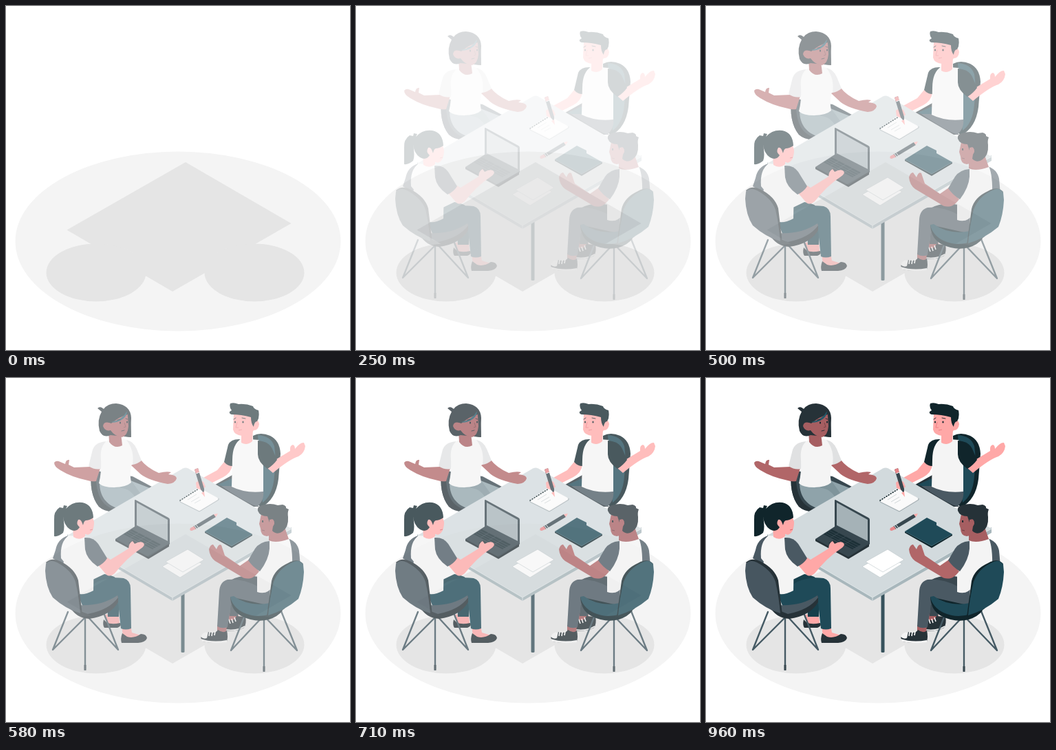
An HTML page for the animation above (1 s loop, 500 by 500 pixels).

```html
<!DOCTYPE html>
<html lang="en">
<head>
<meta charset="utf-8">
<title>Round the table</title>
<style>
html, body { margin: 0; width: 100%; height: 100%; overflow: hidden; background: #fff; }
svg { display: block; width: 100vw; height: 100vh; }
#scene { opacity: 0; }
.ink { fill: #10252b; }
.dark { fill: #263238; }
.slate { fill: #37474f; }
.grey { fill: #4a5963; }
.teal { fill: #1f4a58; }
.steel { fill: #8fa3aa; }
.white { fill: #f4f4f4; }
.shade { fill: #e0e1e2; }
.pink { fill: #ffa8a7; }
.brown { fill: #b16668; }
.deep { fill: #a65e61; }
.line { fill: none; stroke: #10252b; stroke-linecap: round; stroke-linejoin: round; }
.leg { fill: none; stroke: #455a64; stroke-width: 2.4; stroke-linecap: round; stroke-linejoin: round; }
</style>
</head>
<body>
<svg viewBox="0 0 500 500">
  <ellipse cx="250" cy="342" rx="236.5" ry="130.5" fill="#f4f4f4"/>
  <g fill="#e5e5e5">
    <path d="M261 227L414.500 316L242 415L88.500 325.500Z"/>
    <ellipse cx="131" cy="387.500" rx="72.500" ry="42"/>
    <ellipse cx="361" cy="387.500" rx="72.500" ry="42"/>
  </g>

  <g id="scene">
    <!-- back left -->
    <g>
      <path class="slate" d="M125 134C121 154 125 175 135 187Q143 194 154 194L212 158L184 143Z"/>
      <path class="dark" d="M125 134C121 154 125 175 135 187Q143 194 154 194L158 191C140 186 133 172 131 150Z"/>
      <path class="steel" d="M136 152C136 172 146 184 161 189L209 160L181 149Z"/>
      <path d="M158 160Q178 157 188 174L196 169Q187 155 181 149Z" fill="#7f949b"/>
      <path class="brown" d="M123 129L137 131L131 150Q125 151 119 149Q95 144 79 134Q70 129 70 123Q73 119 79 122L86 125Q87 118 92 119L91 126L99 130Z"/>
      <path class="shade" d="M146 92Q130 93 126 104L120 128Q129 134 138 132L142 112Z"/>
      <path class="white" d="M147 91L172 89Q183 91 188 99L190 124Q187 127 183 127Q179 137 182 152Q174 159 157 159Q141 159 135 153Q139 138 138 119Q136 99 147 91Z"/>
      <path class="deep" d="M149 78L150 93Q158 104 169 98L167 80Z"/>
      <path class="dark" d="M142 45Q137 40 133 44L139 49Q132 61 136 77Q141 88 152 83L181 86L182 58Q181 39 160 37Q148 37 142 45Z"/>
      <path class="deep" d="M153 66Q165 56 177 53L178 70Q177 83 169 86Q158 85 152 76Q144 78 141 70Q142 63 150 65Z"/>
      <path d="M153 64Q169 61 176 48Q176 57 166 62Q158 66 153 64Z" fill="#24596a"/>
      <path class="dark" d="M175 47Q182 53 182 86L174 85Q180 76 178 57Z"/>
      <ellipse class="ink" cx="166" cy="65" rx="1" ry="1.500"/>
      <ellipse class="ink" cx="176" cy="64" rx="1" ry="1.500"/>
      <path class="line" d="M162 61l4-1M174 59l3 1M168 77l4-1" stroke-width=".8"/>
      <path d="M172 65l2 6l-3 1" fill="none" stroke="#713d42" stroke-width=".8"/>
    </g>

    <!-- back right -->
    <g>
      <path class="ink" d="M359 84Q370 78 384 84Q398 91 399 110L396 147Q392 177 371 188L361 180Z"/>
      <path class="teal" d="M366 83Q385 84 390 99Q393 117 390 143Q388 170 373 181Z"/>
      <path class="dark" d="M304 155L329 141L332 166L368 187L355 187Z"/>
      <path class="teal" d="M308 155L328 146L329 162Z"/>
      <path class="grey" d="M329 157L374 163Q376 178 365 187Q348 181 313 157Z"/>
      <path class="pink" d="M317 122L329 127Q327 138 316 144L288 158Q279 163 276 157Q276 150 283 147L307 134Z"/>
      <path class="pink" d="M380 131L393 118L413 106Q412 98 417 97Q420 98 420 103Q428 93 433 94L435 99Q434 109 425 114Q412 118 388 138Z"/>
      <path class="ink" d="M341 89Q327 88 323 97L317 122Q322 128 329 128L336 109Z"/>
      <path class="white" d="M342 88L367 90Q375 99 374 119L374 165Q348 168 328 158L329 119Q329 96 342 88Z"/>
      <path class="ink" d="M366 91Q382 92 387 103L394 119Q388 127 380 132Q366 122 366 111Z"/>
      <path class="pink" d="M342 78L342 94Q350 99 358 92L359 74Z"/>
      <path class="pink" d="M331 52Q347 46 362 51L361 62Q367 60 368 67Q367 76 360 76Q356 84 343 84Q332 83 330 75Z"/>
      <path class="ink" d="M326 37Q331 35 338 38Q349 37 359 41Q360 45 367 47Q369 57 365 63Q361 63 360 71Q356 66 356 57Q342 53 328 53Q324 52 325 49L328 47Q324 42 326 37Z"/>
      <ellipse class="ink" cx="333" cy="64" rx="1" ry="1.500"/>
      <ellipse class="ink" cx="344.500" cy="64" rx="1.100" ry="1.600"/>
      <path class="line" d="M331 60l3-2M343 58l5 1" stroke-width=".9"/>
      <path d="M336 64l-2 8l4 0M338 76l5-1" fill="none" stroke="#e8757d" stroke-width=".8"/>
    </g>

    <!-- table -->
    <g>
      <rect x="254.500" y="313" width="5" height="86" rx="1.500" fill="#37525c"/>
      <path d="M89 227L242 314L415 217V225L242 324L89 234Z" fill="#a8b7bc"/>
      <path d="M89 229L257 131.500Q261 129.500 265 131.500L415 219L242 319Z" fill="#d2dadd"/>
      <path d="M89 229L242 319L415 219M242 319V324" fill="none" stroke="#e6ecee" stroke-width=".8"/>

      <path class="white" d="M253 178V180L281 194L309 177V175Z" stroke="#74858c" stroke-width=".7"/>
      <path d="M280 159L309 175L281 192L252 178Z" fill="#fafafa"/>
      <path class="line" d="M253 178L280 161" stroke-width="1.600" stroke-dasharray="1 2.600"/>
      <path d="M264 177l13-8M269 180l12-7M274 182l9-5" fill="none" stroke="#b4bec2" stroke-width=".6"/>
      <path class="pink" d="M276 152Q281 147 287 151L290 158L284 163L277 160Z"/>
      <path class="slate" d="M274 133L279 131L288 161L288 168L283 162Z"/>
      <path d="M274 133L279 131L281 137L276 139Z" fill="#e88588"/>
      <path d="M276.500 139L281 137" stroke="#fff" stroke-width="1"/>
      <path class="pink" d="M284 167L288 165L289 173Z"/>

      <path class="slate" d="M272 216L302 198L305 202L275 220Z"/>
      <path d="M268 218L273 215.500L276 219.500L270 222Q266 222 268 218Z" fill="#e88588"/>
      <path d="M274 215L277 219M276.500 213.500L279.500 217.500" stroke="#fff" stroke-width="1"/>
      <path class="pink" d="M302 198L308 197L305 202Z"/>

      <path class="ink" d="M289 223L328 244L358 227V229L328 247L289 225Z"/>
      <path class="teal" d="M321 203L335 210L335 214L358 227L328 244L289 223Z"/>
      <path d="M289 223L328 244L358 227" fill="none" stroke="#36616e" stroke-width=".6"/>

      <g fill="#fff" stroke="#bcc6ca" stroke-width=".6">
        <path d="M259 256L285 270L253 290L227 274Z"/>
        <path d="M264 249L288 264L257 282L232 267Z"/>
      </g>

      <path class="dark" d="M159 234V237L207 263L237 245V240Z"/>
      <path class="slate" d="M187 216L237 241L207 260L159 234Z"/>
      <path d="M183 220L225 242L213 249L171 227Z" fill="#1d3037"/>
      <path d="M180 222L222 244M177 224L219 246M174 226L216 248M193 225L181 232M203 230L191 237M213 235L201 242" stroke="#42535b" stroke-width=".6"/>
      <path class="dark" d="M185 236L196 242L189 246L178 240Z"/>
      <path class="slate" d="M187 178Q187 176 190 178L236 203Q238 204 238 206V242L187 217Z"/>
      <path d="M190 181L235 206V237L190 214Z" fill="#a5b2b7"/>
    </g>

    <!-- arm resting over the table -->
    <path class="brown" d="M182 127L196 119Q204 130 222 138Q234 135 240 137L236 140Q248 141 248 146Q246 153 235 154Q208 149 196 140Z"/>
    <path class="shade" d="M175 90Q185 92 190 103L197 120Q191 125 184 126Q187 105 175 90Z"/>

    <!-- front left -->
    <g>
      <path class="pink" d="M144 344L164 342L165 357L146 357Z"/>
      <path class="dark" d="M142 351Q140 359 143 363L162 363Q169 360 166 356Q153 359 146 355Z"/>
      <path d="M118 297L143 285Q158 286 165 297L164 347L148 347L147 325L112 340Z" fill="#173f4b"/>
      <path class="pink" d="M168 359H181L183 370L196 374L187 379L170 377Z"/>
      <path class="dark" d="M169 371Q166 379 168 385H192Q203 384 205 378Q204 372 196 372Q186 379 176 376Z"/>
      <path class="teal" d="M104 314L133 296Q151 288 171 291Q181 294 181 306L182 364Q174 367 167 364L163 327Q141 345 118 347Z"/>
      <path class="grey" d="M90 229Q75 234 72 250L68 262L83 272Z"/>
      <path class="white" d="M91 229L116 231Q128 241 128 260L127 309Q112 317 103 313L99 285L80 262Q78 238 91 229Z"/>
      <path class="pink" d="M134 272L147 261L152 264L178 248Q179 239 184 237L187 241Q196 236 200 240Q203 243 196 248Q176 261 158 284Q151 290 146 286Z"/>
      <path class="grey" d="M114 232Q127 231 134 241L147 262Q142 270 133 274Q117 263 115 249Z"/>
      <path class="pink" d="M97 217L98 231Q107 237 115 230L115 220Z"/>
      <path class="pink" d="M107 205L124 197L128 209Q128 225 119 228Q111 226 106 219Q100 214 104 207Z"/>
      <path class="ink" d="M87 190Q97 179 111 181Q126 184 127 203Q121 207 116 207Q113 208 112 214Q109 204 105 206Q101 212 107 217Q102 225 93 220Q84 214 83 201Q86 219 83 225Q76 231 70 230V206Q69 194 78 188L83 189L84 185L89 186Z"/>
      <path d="M122 221l4-1" stroke="#c8565f" stroke-width=".8"/>

      <path class="leg" d="M90 340L68 395L118 345M115 345V423M141 339L163 395L117 345"/>
      <path class="slate" d="M113.500 417h3v8h-3Z"/>
      <path class="dark" d="M92 331Q101 349 121 350Q151 346 163 326V317Q148 333 119 337Z"/>
      <path class="grey" d="M106 330Q138 332 162 316L163 319Q150 337 119 343L104 337Z"/>
      <path class="dark" d="M58 268Q67 260 80 267Q100 277 105 294L111 344Q99 342 86 330Z"/>
      <path d="M58 270Q64 263 74 268Q95 279 101 296Q106 318 108 342Q87 336 68 319Q58 304 57 280Z" fill="#475660"/>
    </g>

    <!-- front right -->
    <g>
      <path class="deep" d="M323 342H337L340 354L324 357Z"/>
      <path class="dark" d="M321 350Q331 356 335 346L348 347Q350 357 346 363Q334 369 318 367Z"/>
      <path d="M324 351l2 6M328 350l2 6M332 348l2 6" stroke="#fff" stroke-width="1.500"/>
      <path d="M320 366Q336 368 347 361" fill="none" stroke="#f4f4f4" stroke-width="1.500"/>
      <path d="M326 294Q345 284 366 289L367 312L340 325L337 346L325 346Z" fill="#3a4850"/>
      <path class="deep" d="M307 359H321L320 371L307 370Z"/>
      <path class="dark" d="M293 369Q305 372 308 366Q316 372 321 367Q323 376 321 383Q304 387 286 383Q282 379 284 375Z"/>
      <path class="white" d="M283 376Q286 369 294 369L292 378Q287 380 283 376ZM283 379Q300 385 321 381V384Q303 387 285 383Z"/>
      <path d="M296 369l-1 6M300 369l-1 6M304 368l-1 6" stroke="#fff" stroke-width="1.600"/>
      <path class="grey" d="M384 301L366 303Q344 291 322 293Q311 296 310 310L307 361Q314 365 322 362L327 329Q346 348 382 344Z"/>
      <path class="grey" d="M409 233Q423 237 426 251L428 274L411 284Z"/>
      <path class="white" d="M384 236L411 233Q417 246 416 276L388 302Q380 316 365 311V278Z"/>
      <path class="brown" d="M353 264L368 281Q362 289 356 291Q347 293 341 288L304 266Q296 260 295 249Q297 242 301 242L306 249Q309 240 313 243L318 258L340 273Z"/>
      <path class="grey" d="M383 237Q369 238 362 248L352 265Q359 275 369 281Q382 264 383 248Z"/>
      <path class="deep" d="M382 221V236Q393 241 411 234L405 217Z"/>
      <path class="deep" d="M371 198L390 202L392 219Q389 229 379 230Q370 229 370 219L368 212Z"/>
      <path class="dark" d="M366 193Q365 186 372 185Q384 181 395 185L402 184Q408 186 407 189L411 191Q409 195 410 202Q411 217 402 223Q394 229 387 222L388 216Q392 208 387 205Q384 206 383 210L380 201Q369 201 366 193Z"/>
      <path class="deep" d="M383 206Q390 204 390 212Q387 219 383 214Z"/>
      <path class="ink" d="M372 207h2v3h-1.500Z"/>
      <path d="M372 221l4 1" stroke="#5f3238" stroke-width=".8"/>

      <path class="leg" d="M349 340L327 396L373 347M375 346V425M400 339L423 396L376 347"/>
      <path class="slate" d="M373.500 419h3v8h-3Z"/>
      <path class="ink" d="M326 318Q327 338 342 346Q362 356 382 351Q395 347 402 338L384 331Z"/>
      <path class="teal" d="M326 318L331 317Q353 333 384 327V343Q365 350 345 341Q329 333 326 318Z"/>
      <path class="ink" d="M432 270Q424 261 410 269Q390 278 386 295L379 347Q392 346 405 335Z"/>
      <path class="teal" d="M432 271Q426 263 416 268Q396 277 389 296Q383 320 381 345Q405 338 425 321Q432 304 433 282Z"/>
    </g>
  </g>
</svg>
<script>
const FPS = 24, LOOP = 1000, FIRST = 4, LAST = 23;

function opacityAt(tick) {
  const u = Math.max(0, (tick - FIRST + 1) / (LAST - FIRST + 1));
  return 1 - Math.pow(1 - u, 1.18);
}

// One held step per tick, snapped to hundredths of a second.
const steps = Array.from({ length: FPS }, (_, tick) => ({
  offset: Math.round(tick * 100 / FPS) / 100,
  opacity: opacityAt(tick),
  easing: "step-end"
}));
steps.push({ offset: 1, opacity: 1 });

document.getElementById("scene").animate(steps, { duration: LOOP, iterations: Infinity });
</script>
</body>
</html>
```
